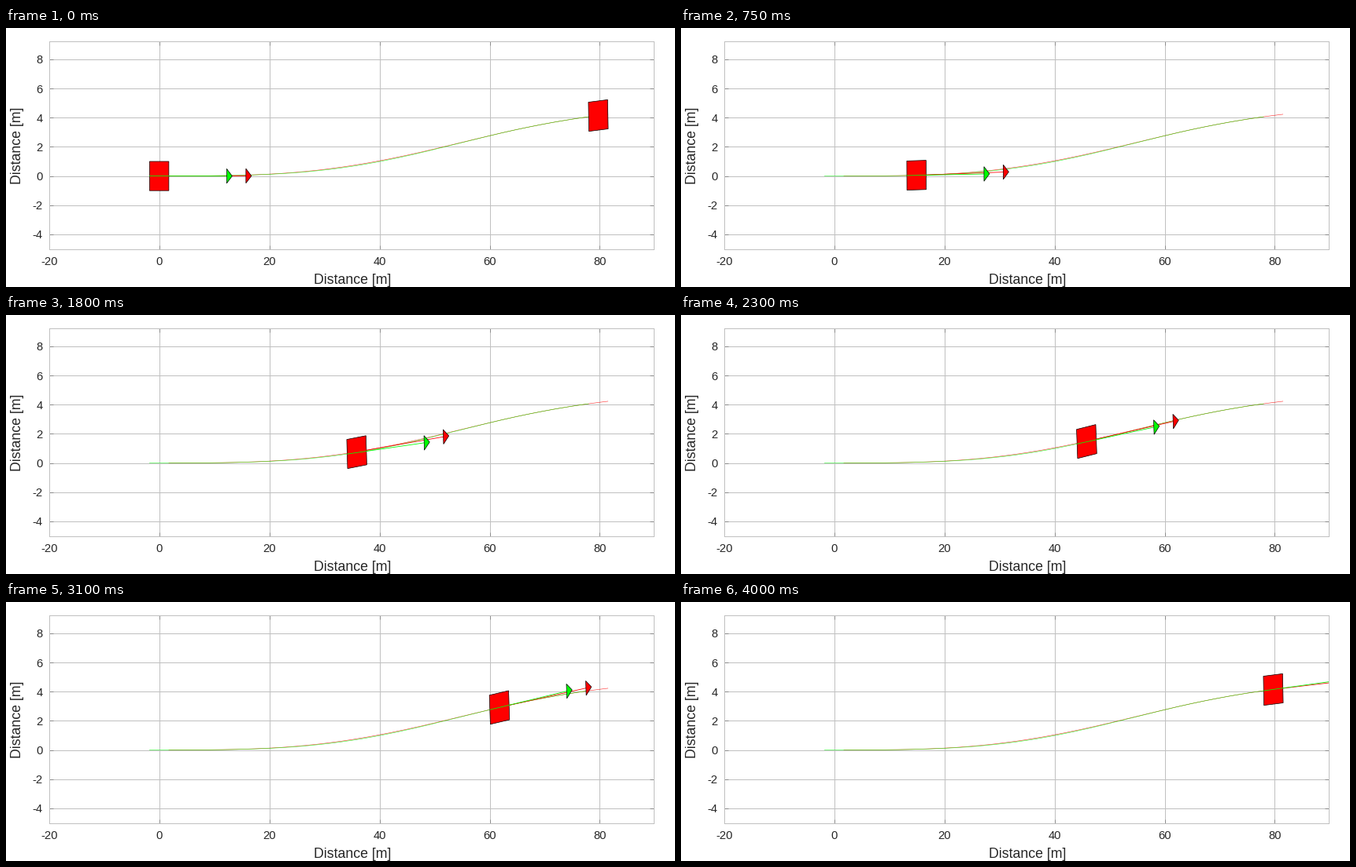
Write a matplotlib script that moves like this. It is 850 px wide and 330 px high and loops after 4.05 s.

```python
import numpy as np
import matplotlib.pyplot as plt
from matplotlib.animation import FuncAnimation
from matplotlib.patches import Polygon

W, H = 850, 330
PT = 0.72  # points per pixel at 100 dpi
LEFT, RIGHT, TOP, BOTTOM = 54.67, 823.0, 17.0, 281.56  # plot box in pixels
X_SCALE, Y_SCALE = 6.998, 18.59  # pixels per metre
FRAMES, STEP_MS = 81, 50
HALF_LENGTH, HALF_WIDTH = 1.75, 1.0
ARROW, HEAD = 15.0, 1.0
RED, GREEN, INK, GRID = "#ff0000", "#00ff00", "#262626", "#c0c0c0"

plt.rcParams["font.family"] = "Liberation Sans"

# Road slope sampled every 10 m, integrated to a height profile.
xs = np.linspace(-10, 100, 1101)
knots = np.arange(-10, 101, 10)
slopes = [0, 0, .0035, .019, .0455, .072, .091, .091, .071, .047, .030, .020]
slope = np.interp(xs, knots, slopes)
kernel = np.hanning(61)
slope = np.convolve(np.pad(slope, 30, mode="edge"), kernel / kernel.sum(), "valid")
height = np.concatenate([[0], np.cumsum((slope[1:] + slope[:-1]) / 2 * np.diff(xs))])
height -= np.interp(0, xs, height)


def front_y(x):
    return np.interp(x, xs, height)


def rear_y(x):
    return front_y(x) - 0.05 * np.exp(-((x - 38) / 15) ** 2)


def direction(curve, x):
    return np.arctan(curve(x + 0.5) - curve(x - 0.5))


def place(points, origin, angle):
    c, s = np.cos(angle), np.sin(angle)
    return np.asarray(points) @ np.array([[c, s], [-s, c]]) + origin


def axles(i):
    x = 0.9965 * i
    xr, xf = x - HALF_LENGTH, x + HALF_LENGTH
    return np.array([xr, rear_y(xr)]), np.array([xf, front_y(xf)])


def body(i):
    rear, front = axles(i)
    dx, dy = front - rear
    box = [(-HALF_LENGTH, -HALF_WIDTH), (HALF_LENGTH, -HALF_WIDTH),
           (HALF_LENGTH, HALF_WIDTH), (-HALF_LENGTH, HALF_WIDTH)]
    return place(box, (rear + front) / 2, np.arctan2(dy, dx))


fig = plt.figure(figsize=(W / 100, H / 100), dpi=100, facecolor="white")
ax = fig.add_axes([LEFT / W, 1 - BOTTOM / H, (RIGHT - LEFT) / W, (BOTTOM - TOP) / H])
ax.set_xlim(-20, -20 + (RIGHT - LEFT) / X_SCALE)
ax.set_ylim(-5, -5 + (BOTTOM - TOP) / Y_SCALE)

x_ticks, y_ticks = range(-20, 81, 20), range(-4, 9, 2)
ax.set_xticks(x_ticks, [str(v) for v in x_ticks])
ax.set_yticks(y_ticks, [str(v) for v in y_ticks])
ax.tick_params(direction="in", top=True, right=True, length=5 * PT,
               width=PT, color="#8c8c8c", labelcolor=INK, labelsize=14.7 * PT)
ax.tick_params(axis="x", pad=9.9 * PT)
ax.tick_params(axis="y", pad=8 * PT)
ax.grid(color=GRID, linewidth=PT)
ax.set_axisbelow(True)
for spine in ax.spines.values():
    spine.set(color=GRID, linewidth=PT)

label = dict(ha="center", va="center", color=INK, fontsize=17.8 * PT)
fig.text(440 / W, 1 - 321.8 / H, "Distance [m]", **label)
fig.text(14.8 / W, 1 - 150 / H, "Distance [m]", rotation=90, **label)

# Full wheel tracks of the front and rear axle.
start, end = axles(0), axles(FRAMES - 1)
for k, curve, color in ((1, front_y, RED), (0, rear_y, GREEN)):
    track = np.linspace(start[k][0], end[k][0], 400)
    ax.plot(track, curve(track), color=color, lw=0.6 * PT, alpha=0.8, zorder=3)


def add_patch(color, zorder):
    patch = Polygon(np.zeros((3, 2)), closed=True, facecolor=color,
                    edgecolor="black", lw=0.7 * PT, joinstyle="miter", zorder=zorder)
    return ax.add_patch(patch)


def add_arrow(color, zorder):
    shaft, = ax.plot([], [], color=color, lw=0.8 * PT, zorder=zorder)
    return shaft, add_patch(color, zorder + 1)


last_car = add_patch(RED, 4)
last_car.set_xy(body(FRAMES - 1))
car = add_patch(RED, 5)
red_arrow = add_arrow(RED, 6)
green_arrow = add_arrow(GREEN, 8)


def set_arrow(arrow, origin, angle):
    shaft, head = arrow
    base = ARROW - HEAD
    shaft.set_data(*place([(0, 0), (base, 0)], origin, angle).T)
    head.set_xy(place([(base, -0.5), (ARROW, 0), (base, 0.5)], origin, angle))


def update(i):
    rear, front = axles(i)
    car.set_xy(body(i))
    last_car.set_visible(i == 0)
    set_arrow(red_arrow, front, direction(front_y, front[0]))
    set_arrow(green_arrow, rear, direction(rear_y, rear[0]))
    return car, last_car, *red_arrow, *green_arrow


anim = FuncAnimation(fig, update, frames=FRAMES, interval=STEP_MS,
                     repeat=True, repeat_delay=0, blit=False)
plt.show()
```
